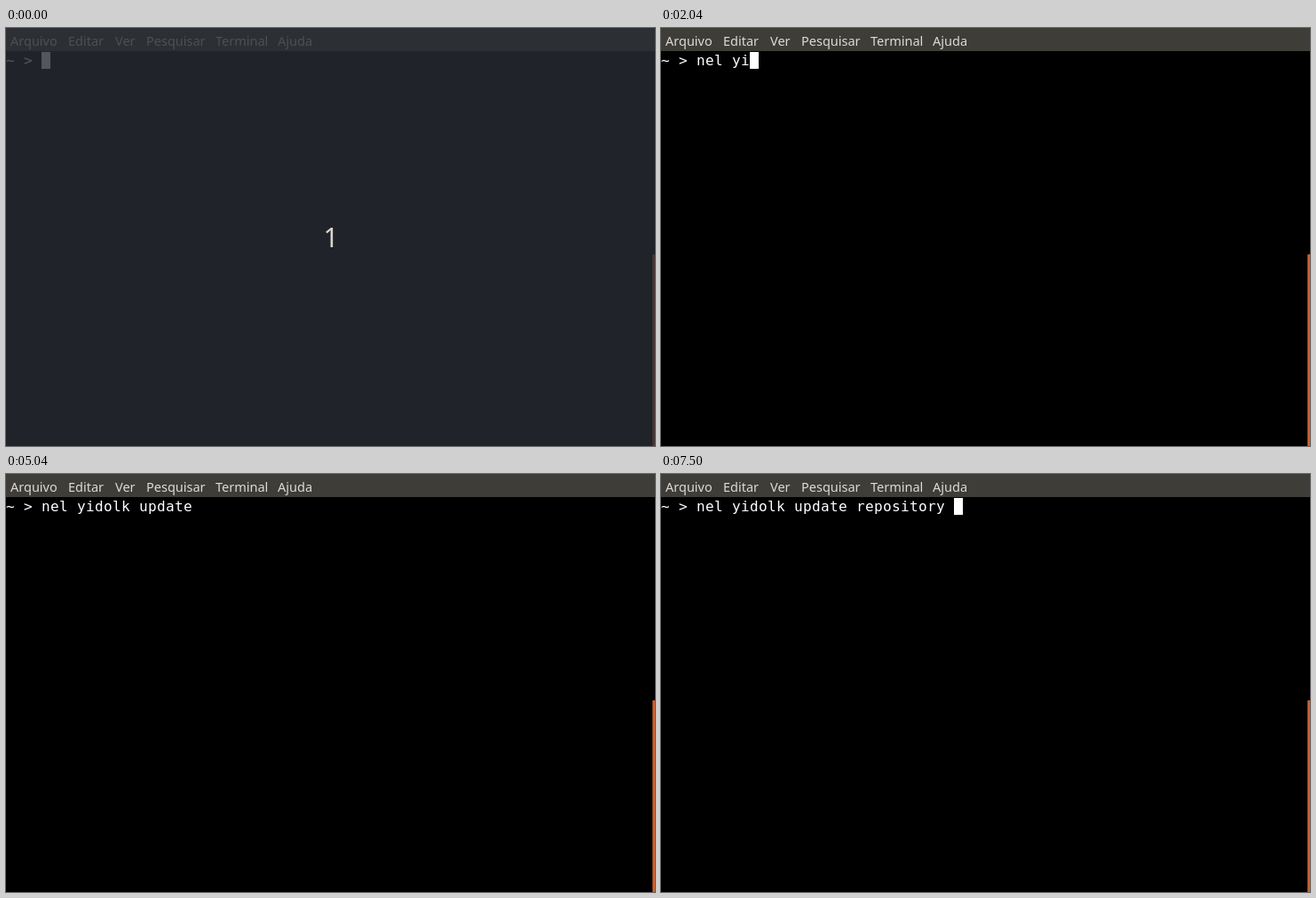
Write an HTML page that moves like this. It is 731x471 px and loops after 8000 ms.

```html
<!DOCTYPE html>
<html lang="pt">
<head>
<meta charset="utf-8">
<title>Terminal</title>
<style>
html, body { margin: 0; width: 100%; height: 100%; overflow: hidden; background: #000; }
svg { display: block; }
text { white-space: pre; }
.menu { font: 14.5px "Noto Sans", "Open Sans", sans-serif; fill: #dfdbd2; }
#line { font: 16px "DejaVu Sans Mono", monospace; fill: #fff; }
#count text { font: 30px "Noto Sans", sans-serif; fill: #d9d5c9; }
</style>
</head>
<body>
<svg width="731" height="471" viewBox="0 0 731 471">
  <rect width="731" height="471"/>
  <rect width="731" height="26" fill="#3e3d38"/>
  <g class="menu">
    <text x="5" y="20">Arquivo</text>
    <text x="70" y="20">Editar</text>
    <text x="123" y="20">Ver</text>
    <text x="158" y="20">Pesquisar</text>
    <text x="236" y="20">Terminal</text>
    <text x="306" y="20">Ajuda</text>
  </g>
  <path d="M731 255h-2q-1 0-1 1v215h3z" fill="#a54d26"/>
  <rect x="729" y="255" width="2" height="216" fill="#cd602f"/>
  <text id="line" y="42"></text>
  <rect id="cursor" y="27" width="10" height="19" fill="#fff"/>
  <g id="count">
    <rect width="731" height="471" fill="#282c34" fill-opacity=".8"/>
    <text x="357.5" y="246.5">1</text>
  </g>
</svg>
<script>
const LOOP = 8000, CELL = 10, BLINK = 578, PROMPT = "~ > ";

// bursts of typing: start, time per key (0 = tab completion), text
const BURSTS = [
  [590, 265, "nel "],
  [1920, 120, "yi"], [2420, 0, "dolk "],
  [3330, 250, "up"], [4460, 0, "date "],
  [5380, 155, "repos"], [6290, 0, "itory "]
];
const keys = BURSTS.flatMap(([at, step, text]) =>
  [...text].map((char, i) => ({ char, time: at + i * step })));

const [line, cursor, count] = ["line", "cursor", "count"].map(id => document.getElementById(id));
const show = (el, on) => el.setAttribute("visibility", on ? "visible" : "hidden");

// one x per character keeps the text on the terminal's cell grid
line.setAttribute("x", Array.from({ length: PROMPT.length + keys.length }, (_, i) => i * CELL).join(" "));

const start = performance.now();
function draw(now) {
  const t = Math.max(0, now - start) % LOOP;
  const typed = keys.filter(key => key.time <= t);
  const text = PROMPT + typed.map(key => key.char).join("");
  if (line.textContent !== text) line.textContent = text;

  // every key press restarts the blink with the cursor lit
  const pressed = typed.length ? typed.at(-1).time : 460 - BLINK;
  cursor.setAttribute("x", text.length * CELL);
  show(cursor, Math.floor((t - pressed) / BLINK) % 2 === 0);
  show(count, t < 40);
  requestAnimationFrame(draw);
}
draw(start);
</script>
</body>
</html>
```
